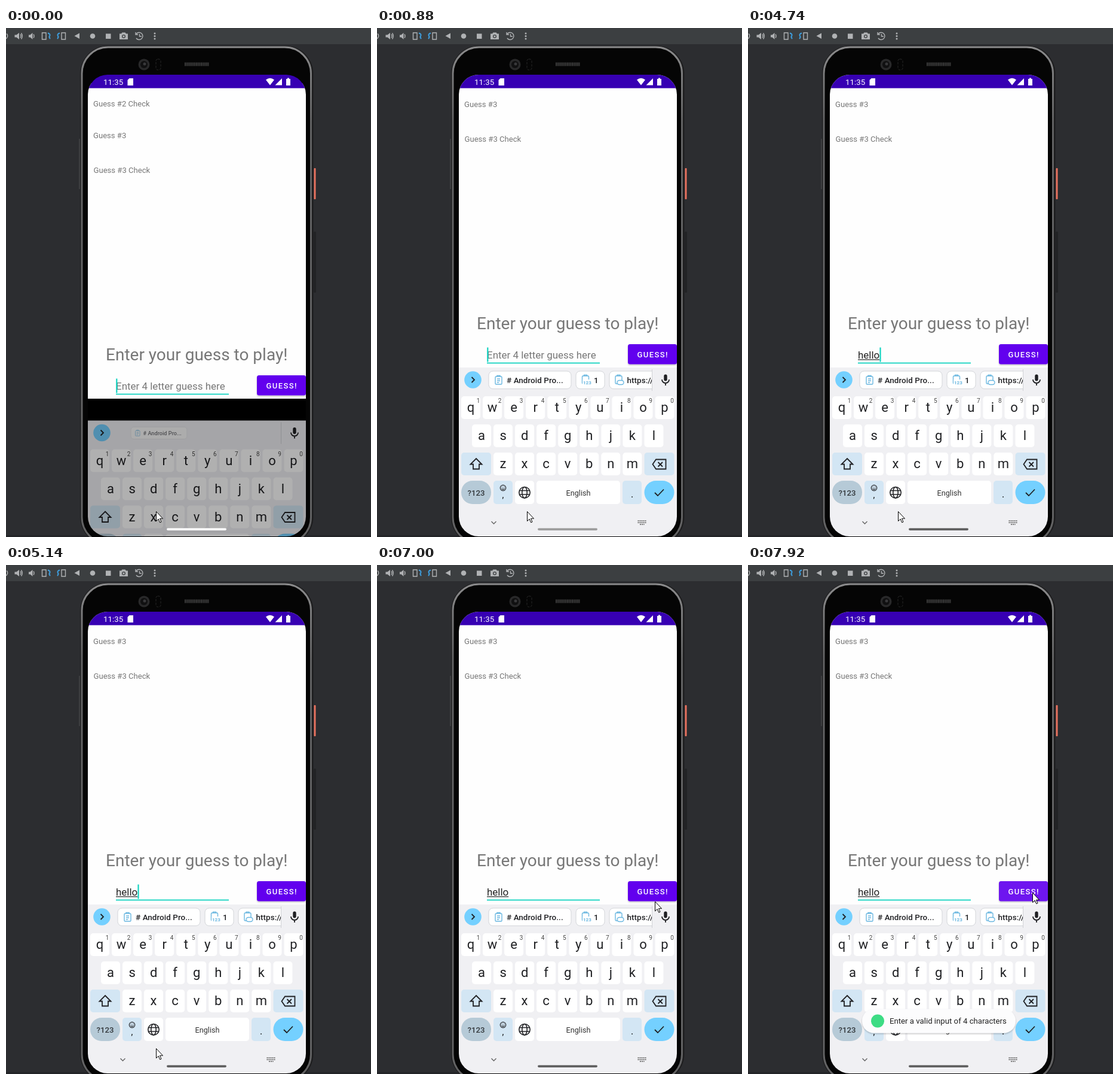
An HTML page that plays this animation: 611x850 px, repeating every 8000 ms.

```html
<!DOCTYPE html>
<html lang="en">
<head>
<meta charset="utf-8">
<title>Word guess</title>
<style>
  html, body { margin: 0; width: 100%; height: 100%; overflow: hidden; background: #2c2d30; }
  svg { display: block; font-family: Roboto, sans-serif; }
  text { white-space: pre; }
  .line { fill: none; stroke: #202124; stroke-width: 1.8; }
  .tool { fill: none; stroke: #b0b2b4; stroke-width: 1.4; }
  .label { font-size: 13.1px; fill: #777; }
  .chip { fill: #fff; stroke: #d3d5d9; }
  .chip-text { font-size: 13.4px; font-weight: 500; letter-spacing: .08px; fill: #202124; }
  .clip-icon { fill: none; stroke: #6ab7e0; stroke-width: 1.4; }
  .key { font-size: 22px; fill: #202124; text-anchor: middle; }
  .hint-digit { font-size: 10px; fill: #444; text-anchor: middle; }
</style>
</head>
<body>
<svg width="611" height="850" viewBox="0 0 611 850">
  <defs>
    <clipPath id="screenClip"><rect x="137" y="78" width="365" height="771" rx="33"/></clipPath>
    <clipPath id="stripClip"><rect x="180" y="566" width="280" height="44"/></clipPath>
    <linearGradient id="rim" x2="0" y2="1">
      <stop offset="0" stop-color="#8a8a8b"/><stop offset=".15" stop-color="#626263"/>
    </linearGradient>
    <filter id="shadow" x="-10%" y="-30%" width="120%" height="180%">
      <feDropShadow dx="0" dy="1.5" stdDeviation="1.2" flood-opacity=".25"/>
    </filter>
    <g id="clipboard" class="clip-icon">
      <rect x="-5.5" y="-6" width="11" height="13" rx="1.5"/>
      <path d="M-2.5-6V-7.5H2.5V-6"/>
    </g>
  </defs>

  <!-- emulator toolbar -->
  <rect width="611" height="27" fill="#3c3f41"/>
  <rect y="847" width="611" height="3" fill="#232427"/>
  <g class="tool">
    <path d="M1 9.5A5 5 0 0 1-1 18M24 10.5Q26 13.500 24 16.500M25.500 8.500Q29 13.500 25.500 18.500M46 10.500Q48 13.500 46 16.500"/>
    <path d="M60.500 8H67V19H60.500ZM93 8H99.500V19H93Z"/>
    <path d="M70 8.500Q75 10 73 13.500Q71.500 15 74 18M90 8.500Q85 10 87 13.500Q88.500 15 86 18" stroke="#3d9fe0" stroke-width="2"/>
    <path d="M218 10A6 6 0 1 1 218 17M217 7V11H221M223.500 10V14H227"/>
  </g>
  <g fill="#b0b2b4">
    <path d="M14.500 11.500H17.500L22 8V19L17.500 15.500H14.500ZM38 11.500H40.500L44.500 8V19L40.500 15.500H38Z"/>
    <path d="M123 8.500V18L114.500 13.300ZM167 9.500H175.500V18H167Z"/>
    <circle cx="145" cy="13.500" r="4.300"/>
    <path d="M190 9.500H193L194.500 7.500H199.500L201 9.500H204V19H190Z"/>
    <circle cx="197" cy="14" r="3" fill="#3c3f41"/><circle cx="197" cy="14" r="1.700"/>
    <circle cx="249" cy="9" r="1.500"/><circle cx="249" cy="13.500" r="1.500"/><circle cx="249" cy="18" r="1.500"/>
  </g>

  <!-- phone -->
  <rect x="515.500" y="234" width="3" height="52" rx="1" fill="#e9735f"/>
  <rect x="515" y="340" width="4" height="102" rx="1.500" fill="#222325"/>
  <rect x="122" y="185" width="2" height="84" fill="#3f4042"/>
  <rect x="124" y="29.500" width="390.500" height="834" rx="47" fill="#1d1d1e"/>
  <rect x="127" y="32" width="383.500" height="829" rx="44" fill="#050505" stroke="url(#rim)" stroke-width="3"/>
  <circle cx="231" cy="61" r="9.500" fill="#29292a"/><circle cx="231" cy="61" r="6" fill="#101011"/><circle cx="232" cy="60" r="2.500" fill="#38383a"/>
  <rect x="251" y="52" width="8" height="18" rx="3" fill="none" stroke="#262626" stroke-dasharray="4 2"/>
  <path d="M299 60.500H340" stroke="#3a3a3a" stroke-width="6" stroke-dasharray="2 .7"/>

  <g clip-path="url(#screenClip)">
    <rect x="137" y="78" width="365" height="771" fill="#000"/>
    <g id="app">
      <rect x="137" y="40" width="365" height="527" fill="#fefefe"/>
      <g class="label">
        <text x="146" y="79">Guess #2 Check</text>
        <text x="146" y="131.500">Guess #3</text>
        <text x="146.500" y="190">Guess #3 Check</text>
      </g>
      <text x="167" y="502.500" font-size="28" fill="#777">Enter your guess to play!</text>
      <text id="hint" x="184" y="552" font-size="16.950" fill="#777">Enter 4 letter guess here</text>
      <text id="typed" x="184" y="552" font-size="16.950" fill="#222"></text>
      <rect id="underline" x="184" y="553.300" height="1.200" fill="#222"/>
      <rect x="184" y="558.600" width="189" height="1.800" fill="#12d3c0"/>
      <rect id="caret" y="533.500" width="2.200" height="24" fill="#12d3c0"/>
      <rect id="button" x="420" y="528" width="82" height="33.500" rx="3.500" filter="url(#shadow)"/>
      <text x="435.500" y="550" font-size="13.100" font-weight="500" letter-spacing="1.350" fill="#fff">GUESS!</text>
    </g>

    <rect x="137" y="78" width="365" height="22.500" fill="#3700b3"/>
    <text x="163" y="95" font-size="13.300" fill="#fff">11:35</text>
    <g fill="#fff">
      <path d="M206.500 84H213V96H203.500V87Z"/>
      <path d="M435 86.500Q442 81 449 86.500L442 95.500ZM462 84V95.500H450.500Z"/>
      <path d="M471 83.500H474V85H476V96H469V85H471Z"/>
    </g>

    <g id="keyboard">
      <rect x="137" y="567" width="365" height="290" fill="#f0f0f3"/>
      <circle cx="160.500" cy="587.500" r="14.300" fill="#74d0ff"/>
      <path class="line" d="M158.500 583L163 587.500L158.500 592"/>
      <g clip-path="url(#stripClip)">
        <g id="mainChip">
          <rect class="chip" x="187" y="573" width="138" height="29.500" rx="7"/>
          <use href="#clipboard" x="203.500" y="588"/>
          <path class="clip-icon" d="M201 586H206M201 589H206M201 592H204"/>
          <text class="chip-text" x="217" y="593"># Android Pro...</text>
        </g>
        <g id="moreChips">
          <rect class="chip" x="333" y="573" width="48" height="29.500" rx="7"/>
          <use href="#clipboard" x="349" y="587"/>
          <rect x="344" y="587" width="15" height="9" fill="#fff"/>
          <text x="345" y="594.500" font-size="8" font-weight="700" fill="#6ab7e0">123</text>
          <text class="chip-text" x="363" y="593">1</text>
          <rect class="chip" x="389" y="573" width="110" height="29.500" rx="7"/>
          <use href="#clipboard" x="404.500" y="587"/>
          <rect x="402" y="588.500" width="11" height="7" rx="3.500" fill="#fff" stroke="#6ab7e0" stroke-width="1.400"/>
          <text class="chip-text" x="418.500" y="593">https://</text>
        </g>
      </g>
      <path d="M460.500 570V606" stroke="#d0d1d5"/>
      <rect x="480.300" y="578.500" width="5.400" height="11" rx="2.700" fill="#202124"/>
      <path class="line" d="M477 587A6 6 0 0 0 489 587M483 593V597"/>

      <g id="keys"></g>

      <path class="line" d="M166 719L175.500 728.500H171V736.500H161V728.500H156.500Z"/>
      <path class="line" d="M467 720.500H483.500V736.500H467L461.500 728.500ZM470.500 725L478 732.500M478 725L470.500 732.500"/>
      <text x="166" y="780.500" font-size="13.200" font-weight="500" text-anchor="middle" fill="#33383c">?123</text>
      <circle class="line" cx="211" cy="768" r="4.700" style="stroke-width:1.200"/>
      <path class="line" d="M208.500 769Q211 772 213.500 769M209.300 766V767.200M212.700 766V767.200" style="stroke-width:1.200"/>
      <text x="211" y="785" font-size="14" text-anchor="middle">,</text>
      <g class="line" style="stroke-width:1.600">
        <circle cx="247" cy="775.700" r="9.200"/><ellipse cx="247" cy="775.700" rx="4.200" ry="9.200"/>
        <path d="M238.500 772.500H255.500M238.500 779H255.500"/>
      </g>
      <text x="337" y="780.500" font-size="12.700" text-anchor="middle" fill="#333">English</text>
      <text x="427" y="784" font-size="16" text-anchor="middle">.</text>
      <path class="line" d="M465 776L470 781L480 770.500"/>
      <path d="M191.500 824L195.500 828L199.500 824" fill="none" stroke="#666" stroke-width="1.400"/>
      <path d="M436.500 823H451M436.500 826H451M440 829H447.500" stroke="#777" stroke-width="1.800" stroke-dasharray="2 1"/>
    </g>

    <rect id="pill" x="269" y="835.300" width="100" height="3.600" rx="1.800"/>

    <g id="toast">
      <rect x="191" y="741.500" width="257" height="40" rx="20" fill="#fcfcfd" filter="url(#shadow)"/>
      <circle cx="217" cy="761.500" r="11" fill="#3ddc84"/>
      <text x="237" y="766" font-size="13.200" fill="#222">Enter a valid input of 4 characters</text>
    </g>
  </g>

  <path id="mouse" d="M0 0V16L3.700 12.500L6.200 18.300L8.500 17.300L6 11.700H11Z" fill="#fff" stroke="#000" stroke-linejoin="round"/>
</svg>

<script>
const LOOP = 8000;
const el = id => document.getElementById(id);
const [app, hint, typed, underline, caret, button, keyboard, mainChip, moreChips, pill, toast, mouse] =
  ['app', 'hint', 'typed', 'underline', 'caret', 'button', 'keyboard', 'mainChip', 'moreChips', 'pill', 'toast', 'mouse'].map(el);

// Keyboard keys
const keyRect = (x, y, w, fill = '#fff', r = 5, h = 38) =>
  `<rect x="${x}" y="${y}" width="${w}" height="${h}" rx="${r}" fill="${fill}"/>`;
const letterRow = (letters, firstX, y, digits = '') => [...letters].map((letter, i) => {
  const x = firstX + i * 36.06;
  return keyRect(x - 16, y, 32) +
    `<text class="key" x="${x}" y="${y + 26}">${letter}</text>` +
    (digits ? `<text class="hint-digit" x="${x + 12.5}" y="${y + 11}">${digits[i]}</text>` : '');
}).join('');
el('keys').innerHTML =
  letterRow('qwertyuiop', 157, 615, '1234567890') +
  letterRow('asdfghjkl', 175, 662) +
  letterRow('zxcvbnm', 211, 709) +
  keyRect(141, 709, 50, '#d3e6f4') + keyRect(447.5, 709, 50, '#d3e6f4') +
  keyRect(141, 756, 50, '#b6cad7', 19, 39) + keyRect(195, 756, 32, '#d3e6f4', 5, 39) +
  keyRect(231, 756, 32, '#fff', 5, 39) + keyRect(267, 756, 140, '#fff', 5, 39) +
  keyRect(411, 756, 32, '#d3e6f4', 5, 39) + keyRect(447.5, 756, 50, '#74d0ff', 19.5, 39);

// Each track holds [start time, values...] until its next entry.
const tracks = {
  slide: [[0, 88.5, 52, .69, .68, 0], [120, 26, 14, .9, .9, .5], [245, 5, 2, 1, 1, 1], [370, 0, 0, 1, 1, 1]],
  text: [[0, ''], [2260, 'h'], [3410, 'hw'], [3790, 'h'], [3910, 'he'], [4190, 'hello']],
  underlined: [[0, 0], [2410, 1], [3540, 2], [3790, 1], [3910, 2], [4190, 5], [4340, 4], [4740, 5]],
  caret: [[0, 1], [370, 0], [880, 1], [1360, 0], [2260, 1], [2720, 0], [3410, 1], [5700, 0],
    [6610, 1], [6880, 0], [7120, 1], [7530, 0]],
  pill: [[0, 255], [370, 235], [610, 198], [880, 158], [1120, 132], [1360, 112], [1620, 97]],
  mouse: [[0, 251.5, 807.5], [5850, 246, 745], [5970, 228, 610], [6090, 204, 509], [6210, 198, 545],
    [6360, 211.5, 552], [6610, 320, 552], [6760, 400, 553], [6880, 450, 560], [7000, 465.5, 562],
    [7120, 473, 557], [7270, 476.5, 547.5]],
  toast: [[0, 50, 0], [7410, 45, .15], [7530, 12, .6], [7680, 1, .95], [7800, 0, 1]],
  button: [[0, '#6200ee'], [7410, '#7a2af1'], [7680, '#7420f0'], [7920, '#6e17ef']],
};
const at = (name, t) => tracks[name].findLast(([start]) => start <= t).slice(1);
const move = (node, x, y) => node.setAttribute('transform', `translate(${x} ${y})`);

function draw(t) {
  const [keyboardY, appY, alpha, chipScale, chipAlpha] = at('slide', t);
  move(keyboard, 0, keyboardY);
  move(app, 0, appY);
  keyboard.setAttribute('opacity', alpha);
  mainChip.setAttribute('transform', `translate(256 588) scale(${chipScale}) translate(-256 -588)`);
  mainChip.setAttribute('opacity', .6 + .4 * chipAlpha);
  moreChips.setAttribute('opacity', chipAlpha);

  const [text] = at('text', t);
  if (typed.textContent !== text) typed.textContent = text;
  hint.setAttribute('opacity', text ? 0 : 1);
  const [count] = at('underlined', t);
  underline.setAttribute('width', count ? typed.getSubStringLength(0, count) : 0);
  caret.setAttribute('x', 184.2 + (text ? typed.getComputedTextLength() : 0));
  caret.setAttribute('opacity', at('caret', t)[0]);

  const [gray] = at('pill', t);
  pill.setAttribute('fill', `rgb(${gray},${gray},${gray})`);
  button.setAttribute('fill', at('button', t)[0]);
  const [toastY, toastAlpha] = at('toast', t);
  move(toast, 0, toastY);
  toast.setAttribute('opacity', toastAlpha);
  move(mouse, ...at('mouse', t));
}

const begin = performance.now();
function tick() {
  draw((performance.now() - begin) % LOOP);
  requestAnimationFrame(tick);
}
tick();
</script>
</body>
</html>
```
